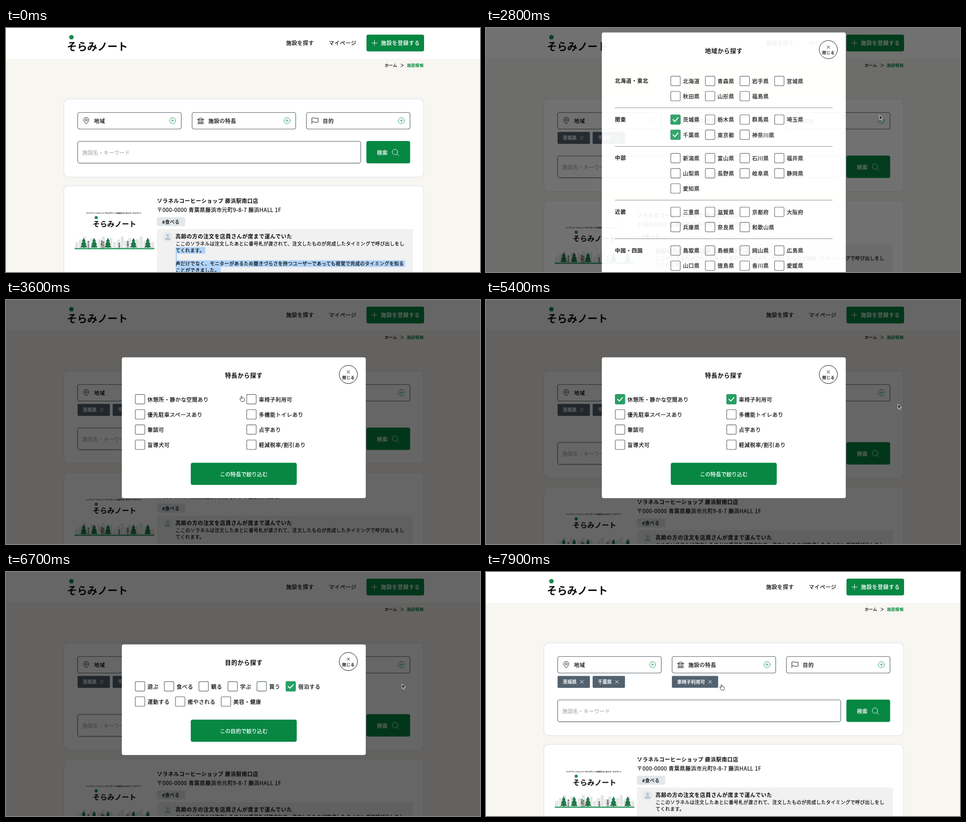
An HTML page for the animation above (8 s loop, 1000x516 px).

```html
<!DOCTYPE html>
<html lang="ja">
<head>
<meta charset="utf-8">
<title>施設検索</title>
<style>
html, body { margin: 0; width: 100%; height: 100%; overflow: hidden; background: #f7f6f1; }
svg { display: block; width: 100vw; height: 100vh; }
/* the thin stroke gives the regular cut a medium weight */
text { font-family: "Noto Sans CJK JP", "Noto Sans CJK", "Noto Sans", sans-serif; letter-spacing: .05em; color: #0c0c0c; fill: currentColor; stroke: currentColor; stroke-width: .25; }
.bold { font-weight: 700; stroke: none; }
.tight { letter-spacing: 0; }
.mid { text-anchor: middle; }
.white { color: #fff; }
.hint { color: #9a9fa8; stroke: none; }
.green { color: #068742; fill: currentColor; }
.line { fill: none; stroke: #111; stroke-width: 1; stroke-linecap: round; stroke-linejoin: round; }
.line.pale { stroke: #fff; }
.line.leaf { stroke: #2a9d5f; }
.field { fill: #fff; stroke: #747d83; stroke-width: 1.4; }
.card { fill: #fff; stroke: #e2e6ea; stroke-width: 1.4; }

/* one loop = 8000 ms, so 1% = 80 ms */
.shift, .grow, .row2, .pick, .hand, .arrow { animation: 8s step-end infinite; }
.shift { animation-name: shift; }
.grow { animation-name: grow; }
.row2 { animation-name: row2; }
@keyframes shift {
  0% { transform: translateY(0); } 16.25% { transform: translateY(30.8px); }
  58.75% { transform: translateY(61.6px); } 97.5% { transform: translateY(30.8px); }
}
@keyframes grow {
  0% { height: 165.3px; } 16.25% { height: 196.1px; }
  58.75% { height: 226.9px; } 97.5% { height: 196.1px; }
}
@keyframes row2 { 0% { transform: translateY(30.8px); } 97.5% { transform: none; } }

.selection { animation-name: selection; }
.ibaraki { animation-name: ibaraki; }
.chiba { animation-name: chiba; }
.rest { animation-name: rest; }
.wheelchair { animation-name: wheelchair; }
.stay { animation-name: stay; }
@keyframes selection { 0% { opacity: 1; } 16.25% { opacity: 0; } }
@keyframes ibaraki { 0% { opacity: 0; } 16.25% { opacity: 1; } }
@keyframes chiba { 0% { opacity: 0; } 22.5% { opacity: 1; } }
@keyframes rest { 0% { opacity: 0; } 52.5% { opacity: 1; } 97.5% { opacity: 0; } }
@keyframes wheelchair { 0% { opacity: 0; } 58.75% { opacity: 1; } }
@keyframes stay { 0% { opacity: 0; } 81.25% { opacity: 1; } 95% { opacity: 0; } }

.modal { opacity: 0; animation: 8s linear infinite; }
.area { animation-name: area; }
.feature { animation-name: feature; }
.purpose { animation-name: purpose; }
@keyframes area { 0%, 2.3% { opacity: 0; } 7%, 34.75% { opacity: 1; } 38.5%, 100% { opacity: 0; } }
@keyframes feature { 0%, 40% { opacity: 0; } 44.4%, 72.25% { opacity: 1; } 76%, 100% { opacity: 0; } }
@keyframes purpose { 0%, 76.5% { opacity: 0; } 80%, 84.8% { opacity: 1; } 88.75%, 100% { opacity: 0; } }

.cursor { animation: move 8s ease-in-out infinite; }
@keyframes move {
  0%, 13.1% { transform: translate(355px, 208px); }
  16%, 17% { transform: translate(402px, 204px); }
  20%, 24% { transform: translate(402px, 231px); }
  30%, 36.9% { transform: translate(833px, 190px); }
  40%, 45% { transform: translate(498px, 209px); }
  50%, 53.1% { transform: translate(284px, 214px); }
  56.25%, 64.4% { transform: translate(555px, 223px); }
  67.5%, 73.75% { transform: translate(872px, 226px); }
  76.25%, 77% { transform: translate(690px, 208px); }
  79.4%, 81.25% { transform: translate(605px, 248px); }
  83.5%, 86.25% { transform: translate(838.5px, 242.5px); }
  91.25%, 95% { transform: translate(694px, 238px); }
  97.5% { transform: translate(523px, 243px); }
  98.75%, 100% { transform: translate(498px, 244px); }
}
.hand { animation-name: hand; }
.arrow { animation-name: arrow; }
@keyframes hand {
  0% { opacity: 0; } 2.5% { opacity: 1; } 26% { opacity: 0; } 38.5% { opacity: 1; }
  65% { opacity: 0; } 75% { opacity: 1; } 82% { opacity: 0; } 90.5% { opacity: 1; }
}
@keyframes arrow {
  0% { opacity: 0; } 26% { opacity: 1; } 38.5% { opacity: 0; } 65% { opacity: 1; }
  75% { opacity: 0; } 82% { opacity: 1; } 90.5% { opacity: 0; }
}
</style>
</head>
<body>
<svg id="stage" viewBox="0 0 1000 516" preserveAspectRatio="none"></svg>
<script>
const BRAND = 'そらみノート';

// Text is placed by its left edge (or middle) and vertical centre.
const text = (x, cy, s, size = 11.2, cls = '') =>
  `<text x="${x}" y="${cy + size * .38}" font-size="${size}" class="${cls}">${s}</text>`;
const rect = (x, y, w, h, rx, attrs) =>
  `<rect x="${x}" y="${y}" width="${w}" height="${h}" rx="${rx}" ${attrs}/>`;
const circle = (x, y, r, attrs) => `<circle cx="${x}" cy="${y}" r="${r}" ${attrs}/>`;
const line = (d, cls = '', attrs = '') => `<path d="${d}" class="line ${cls}" ${attrs}/>`;
const group = (cls, ...parts) => `<g class="${cls}">${parts.join('')}</g>`;
const at = (x, y, ...parts) => `<g transform="translate(${x} ${y})">${parts.join('')}</g>`;
const cross = (x, y, r, cls) =>
  line(`M${x - r} ${y - r}l${2 * r} ${2 * r}m0 ${-2 * r}l${-2 * r} ${2 * r}`, cls);
const plus = (x, y, r, cls) => line(`M${x - r} ${y}h${2 * r}M${x} ${y - r}v${2 * r}`, cls);

const picked = {
  '茨城県': 'ibaraki', '千葉県': 'chiba', '休憩所・静かな空間あり': 'rest',
  '車椅子利用可': 'wheelchair', '宿泊する': 'stay'
};

function header() {
  return rect(0, 0, 1000, 65, 0, 'fill="#fff"') +
    circle(138, 19.5, 4.8, 'fill="#1b8a50"') +
    text(128.5, 39, BRAND, 21.4, 'bold tight') +
    text(591, 32, '施設を探す') + text(681, 32, 'マイページ') +
    rect(760.5, 14, 121.5, 35.5, 4, 'class="green"') +
    plus(777.3, 31.8, 5.6, 'pale') + text(791, 32, '施設を登録する', 11.2, 'white') +
    text(799, 79, 'ホーム', 8.4) + line('M833 76l5.5 3-5.5 3') +
    text(846, 79, '施設情報', 8.4, 'green');
}

function select(x, label, icon) {
  return rect(x, 178.6, 218.6, 35, 4, 'class="field"') + at(x + 18, 196, icon) +
    text(x + 34.5, 196.5, label) +
    circle(x + 200.3, 196, 6.4, 'class="line leaf"') + plus(x + 200.3, 196, 2.8, 'leaf');
}

function tag(x, label) {
  const w = 38.8 + label.length * 9.8;
  return group('pick ' + picked[label],
    rect(x, 219.8, w, 25.2, 2, 'fill="#53626f"'),
    text(x + 11, 232.4, label, 9.8, 'bold tight white'),
    cross(x + w - 17, 232.3, 3.2, 'pale'));
}

function searchCard() {
  const pin = line('M0 6.6C-3.4 3-5.4.8-5.4-1.5a5.4 5.4 0 0 1 10.8 0C5.4.8 3.4 3 0 6.6z') +
    circle(0, -1.4, 2, 'class="line"');
  const hall = line('M-6.5-2.5L0-6.2 6.5-2.5zM-6.8 6.3H6.8M-5 4.2H5M-4.8-2v6M-1.7-2v6M1.7-2v6M4.8-2v6');
  const flag = line('M-6.5 6.5V-5.5c4-2 8 2 13 0V3c-5 2-9-2-13 0');
  return rect(122, 149.8, 759.3, 165.3, 10, 'class="card grow"') +
    select(151.2, '地域', pin) + select(392.6, '施設の特長', hall) + select(633.8, '目的', flag) +
    tag(151, '茨城県') + tag(225, '千葉県') + tag(392.2, '休憩所・静かな空間あり') +
    group('row2', tag(392.2, '車椅子利用可')) + tag(633.5, '宿泊する') +
    group('shift',
      rect(151.2, 239.6, 597.2, 46.2, 4, 'class="field"'),
      text(161, 263.5, '施設名・キーワード', 11.2, 'tight hint'),
      rect(760.3, 239, 92.3, 47.3, 4, 'class="green"'),
      text(782.5, 263.3, '検索', 11.2, 'tight white'),
      circle(820.6, 262.2, 5.7, 'class="line pale"'), line('M824.8 266.4l3.8 3.8', 'pale'));
}

function thumbnail() {
  const towers = Array.from({ length: 21 }, (_, i) => {
    const h = 12 + (i * 7 % 5) * 3;
    return rect(146 + i * 8, 465 - h, 6.5, h, 0, 'fill="#e3e6e5"');
  }).join('');
  const tree = x => `<path d="M${x} 444l4 7h-2l4 7h-2l3 6h-14l3-6h-2l4-7h-2z" fill="#20784b"/>` +
    rect(x - .8, 463.5, 1.6, 3, 0, 'fill="#6b5a48"');
  const person = (x, h, color) => circle(x, 467 - h, 1.7, 'fill="#55595a"') +
    rect(x - 2, 469 - h, 4, h * .45, 1.5, `fill="${color}"`) +
    line(`M${x - 1} ${467 - h * .5}v${h * .5}M${x + 1} ${467 - h * .5}v${h * .5}`, '', 'style="stroke:#666b6d"');
  return text(169, 391.5, 'バリアフリーやユニバーサルデザインな施設をまとめたポータルサイト', 3.66, 'bold tight') +
    circle(190.3, 401, 3.3, 'fill="#1b8a50"') + text(183, 414.5, BRAND, 15.3, 'bold tight') +
    towers + [164, 186, 215, 269, 299].map(tree).join('') +
    person(174, 15, '#a9aeae') + person(202, 16, '#777c7b') + person(206, 14, '#c0a94a') +
    person(239, 11, '#8e9494') + person(257, 15, '#7c8190') +
    rect(145, 465.4, 168, 2.4, 0, 'fill="#20945a"');
}

function resultCard() {
  const marks = [[463.3, 62.5], [477.3, 2.5], [491.3, 483.6], [505.3, 95]]
    .map(([y, w]) => rect(358, y, w, 14, 0, 'fill="#afd3f8"'));
  return group('shift',
    rect(122, 333.6, 759.3, 320, 10, 'class="card"'), thumbnail(),
    text(318.5, 366, 'ソラネルコーヒーショップ 藤浜駅南口店', 11.2, 'bold'),
    text(318.5, 385, '〒000-0000 青葉県藤浜市元町9-8-7 藤浜HALL 1F'),
    rect(318.5, 400, 59.5, 19, 4, 'fill="#e1e7ea"'), text(329.5, 409.8, '#食べる', 9.8),
    rect(318.5, 425, 540, 200, 3, 'fill="#f1f1f1"'),
    circle(341, 442, 10.6, 'fill="#e4eaed"'), circle(341, 438.8, 3, 'fill="#b9c4cb"'),
    '<path d="M335 448.3c0-7 12-7 12 0z" fill="#b9c4cb"/>',
    text(357.5, 440.5, '高齢の方の注文を店員さんが席まで運んでいた', 11.2, 'bold'),
    group('pick selection', ...marks),
    text(358, 456.6, 'ここのソラネルは注文したあとに番号札が渡されて、注文したものが完成したタイミングで呼び出しをし', 9.8),
    text(358, 470.6, 'てくれます。', 9.8),
    text(358, 498.4, '声だけでなく、モニターがあるため聞きづらさを持つユーザーであっても視覚で完成のタイミングを知る', 9.8),
    text(358, 512.4, 'ことができました。', 9.8));
}

function checkbox(x, cy, label) {
  const mark = picked[label] ? group('pick ' + picked[label],
    rect(x - .6, cy - 10.6, 21.2, 21.2, 2.5, 'fill="#27a064"'),
    line(`M${x + 4.8} ${cy + .2}l3.8 3.8 6.8-7.6`, 'pale', 'style="stroke-width:2"')) : '';
  return rect(x, cy - 10, 20, 20, 2.5, 'class="field"') + mark + text(x + 25.8, cy + .6, label);
}

// Labels flow from left to right; a fixed column width can replace the flow.
function checkRow(x, cy, labels, column) {
  return labels.split(' ').map(label => {
    const box = checkbox(x, cy, label);
    x += column || 37.7 + label.length * 11.76;
    return box;
  }).join('');
}

function modal(cls, top, height, title, ...content) {
  return group('modal ' + cls,
    rect(0, 0, 1000, 516, 0, 'fill="#000" fill-opacity=".6"'),
    rect(244.4, top, 514.6, height, 4, 'fill="#fff"'),
    text(501.7, top + 38.4, title, 12.6, 'bold mid'),
    circle(722.3, top + 36.2, 19.2, 'class="line"'), cross(722.3, top + 31, 2.8),
    text(722.5, top + 42.2, '閉じる', 8.4, 'mid'), ...content);
}

const submit = (y, label) => rect(389.8, y, 223.6, 46.8, 4, 'class="green"') +
  text(501.6, y + 24, label, 11.2, 'mid tight white');

const regions = [
  ['北海道・東北', '北海道 青森県 岩手県 宮城県', '秋田県 山形県 福島県'],
  ['関東', '茨城県 栃木県 群馬県 埼玉県', '千葉県 東京都 神奈川県'],
  ['中部', '新潟県 富山県 石川県 福井県', '山梨県 長野県 岐阜県 静岡県', '愛知県'],
  ['近畿', '三重県 滋賀県 京都府 大阪府', '兵庫県 奈良県 和歌山県'],
  ['中国・四国', '鳥取県 島根県 岡山県 広島県', '山口県 徳島県 香川県 愛媛県']
];

function areaModal() {
  let y = 112;
  const content = regions.map(([name, ...rows], i) => {
    const part = text(272, y, name, 11.2, 'bold') +
      (i ? rect(272, y - 25.3, 459, .9, 0, 'fill="#777"') : '') +
      rows.map((row, n) => checkRow(389.8, y + n * 32.1, row)).join('');
    y += rows.length * 32.1 + 17.4;
    return part;
  });
  return modal('area', 9.5, 600, '地域から探す', ...content);
}

function featureModal() {
  const rows = ['休憩所・静かな空間あり 車椅子利用可', '優先駐車スペースあり 多機能トイレあり',
    '筆談可 点字あり', '盲導犬可 軽減税率/割引あり'];
  return modal('feature', 121.3, 297.7, '特長から探す',
    ...rows.map((row, n) => checkRow(272.8, 209.8 + n * 32.1, row, 235)),
    submit(344.3, 'この特長で絞り込む'));
}

function purposeModal() {
  return modal('purpose', 153.2, 233.8, '目的から探す',
    checkRow(272.8, 241.8, '遊ぶ 食べる 観る 学ぶ 買う 宿泊する'),
    checkRow(272.8, 273.9, '運動する 癒やされる 美容・健康'),
    submit(312.3, 'この目的で絞り込む'));
}

function cursor() {
  const hand = 'M-1.5 5.8L-4.6.8C-5.4-.6-3.8-1.5-2.8-.2L-2.1.6V-4.8C-2.1-6.2-.3-6.2-.3-4.8V-1.8' +
    'C.1-2.6 1.5-2.4 1.6-1.5 2.1-2.1 3.3-1.8 3.4-.9 4-1.4 5-.9 5 0V2.5L3.8 5.8z';
  const arrow = 'M-3-6V4.2L-.6 2 1 5.8l1.8-.8L1.2 1.4h3.2z';
  return group('cursor',
    `<path class="hand" d="${hand}" fill="#fff" stroke="#222" stroke-width=".9"/>`,
    `<path class="arrow" d="${arrow}" fill="#222" stroke="#fff" stroke-width=".9"/>`);
}

document.getElementById('stage').innerHTML = [
  rect(0, 0, 1000, 516, 0, 'fill="#f7f6f1"'), header(), searchCard(), resultCard(),
  areaModal(), featureModal(), purposeModal(), cursor()
].join('');
</script>
</body>
</html>
```
